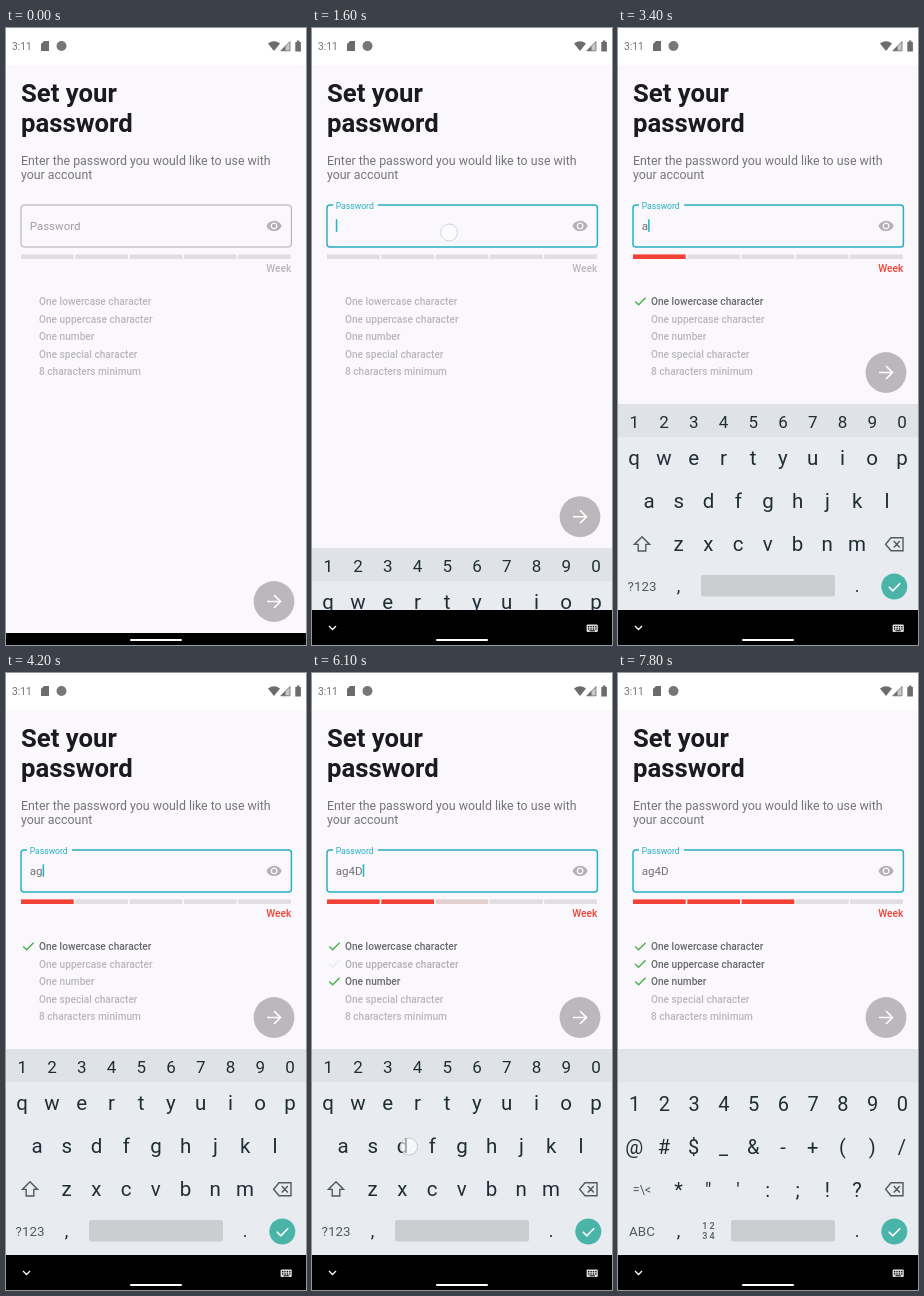
Animation, 300 px wide and 617 px high, one loop 8 s. Source, as an HTML page:

```html
<!DOCTYPE html>
<html lang="en">
<head>
<meta charset="utf-8">
<title>Set your password</title>
<style>
html, body { margin: 0; width: 100%; height: 100%; overflow: hidden; background: #faf8fc; }
svg { display: block; width: 300px; height: 617px; font-family: Roboto, sans-serif; }
.mid { text-anchor: middle; }
.line { fill: none; stroke-linecap: butt; }
</style>
</head>
<body>
<svg id="stage" viewBox="0 0 300 617"></svg>
<script>
const LOOP = 8000;
const OFF = '#b9b7ba', ON = '#69686a', RED = '#f44336', TEAL = '#27b0c5';
const KEY = '#202d36', SOFT = '#505a62';
const stage = document.getElementById('stage');
const $ = id => document.getElementById(id);

const esc = s => s.replace(/&/g, '&amp;').replace(/</g, '&lt;');
const text = (s, x, y, size, fill, extra = '') =>
  `<text x="${x}" y="${y}" font-size="${size}" fill="${fill}" ${extra}>${esc(s)}</text>`;
const rect = (x, y, w, h, fill, extra = '') =>
  `<rect x="${x}" y="${y}" width="${w}" height="${h}" fill="${fill}" ${extra}/>`;
const disc = (x, y, r, fill, extra = '') =>
  `<circle cx="${x}" cy="${y}" r="${r}" fill="${fill}" ${extra}/>`;
const line = (d, stroke, width, extra = '') =>
  `<path class="line" d="${d}" stroke="${stroke}" stroke-width="${width}" ${extra}/>`;

const keys = (chars, x, y, size) => [...chars].map((c, i) =>
  text(c, x + i * 29.75, y, size, KEY, 'class="mid"')).join('');

const statusBar = () =>
  rect(0, 0, 300, 37, '#fff') +
  text('3:11', 6, 22, 10.2, '#707072') +
  '<path d="M38 13h5v10h-8v-7z" fill="#6c6c6e"/>' +
  disc(55.5, 18, 5, '#77777a') +
  '<path d="M262 15.5Q268 11 274 15.5L268 23z" fill="#6c6c6e"/>' +
  '<path d="M284 13.5v9.3h-9.2z" fill="#c9c9cb" stroke="#6c6c6e" stroke-width=".8"/>' +
  '<path d="M279.5 18v4.8h-4.7z" fill="#6c6c6e"/>' +
  '<path d="M289.3 14h1.5v-1.4h2.6V14h1.5v9.4h-5.6z" fill="#6c6c6e"/>';

const heading = () =>
  text('Set your', 15, 74.3, 25.7, '#1b1a1d', 'font-weight="700"') +
  text('password', 15, 104.3, 25.7, '#1b1a1d', 'font-weight="700"') +
  text('Enter the password you would like to use with', 15, 136.8, 12.36, '#757477') +
  text('your account', 15, 151.4, 12.36, '#757477');

const field = () =>
  rect(15, 177, 270.4, 42, 'none', 'id="box" rx="3"') +
  rect(21, 175, 45, 4, '#faf8fc', 'id="gap"') +
  text('Password', 0, 0, 11.5, OFF, 'id="label"') +
  text('', 23.7, 201.8, 11.6, '#727174', 'id="typed"') +
  rect(24, 191.3, 1.5, 12.5, TEAL, 'id="cursor"') +
  `<path transform="translate(259.8 189.6) scale(.69)" fill="#b4b1b5" d="M12 4.5C7 4.5 2.73 7.61 1 12
   c1.73 4.39 6 7.5 11 7.5s9.27-3.11 11-7.5c-1.73-4.39-6-7.5-11-7.5zM12 17c-2.76 0-5-2.24-5-5s2.24-5 5-5
   5 2.24 5 5-2.24 5-5 5zm0-8c-1.66 0-3 1.34-3 3s1.34 3 3 3 3-1.34 3-3-1.34-3-3-3z"/>`;

const rules = ['One lowercase character', 'One uppercase character', 'One number',
  'One special character', '8 characters minimum'];

const meter = () => rules.map((s, i) => {
  const y = 277 + i * 17.5;
  return rect(15 + i * 54.3, 226.4, 52.7, 4.6, '#e0dee0', `id="seg${i}"`) +
    text(s, 33, y, 10.15, OFF, `id="rule${i}" font-weight="500"`) +
    line(`M17.2 ${y - 3.5}l3.4 3.3 7-7`, '#4caf50', 1.4, `id="tick${i}"`);
}).join('') + text('Week', 285.3, 244.2, 10.2, OFF, 'id="grade" text-anchor="end" font-weight="500"');

const letterRows = (id, top, mid, low) => `<g id="${id}">` + rect(0, 376, 300, 33, '#dfe3e7') +
  keys('1234567890', 16.2, 400, 17) + keys(top, 16.2, 436.5, 20.5) +
  keys(mid, 31, 479.5, 20.5) + keys(low, 60.5, 522.5, 20.5) +
  line('M24 508.8l7.6 7.6h-3.8v6.6h-7.6v-6.6h-3.8z', SOFT, 1.4,
    id === 'upper' ? `style="fill:${SOFT}"` : '') +
  text('?123', 24, 563, 13.4, SOFT, 'class="mid"') +
  rect(83, 547, 134, 21.5, '#cbcdd0', 'rx="2.5"') + '</g>';

const symbolRows = () => '<g id="symbols">' + rect(0, 376, 300, 33, '#e1e4e8') +
  keys('1234567890', 16.6, 438, 20) + keys('@#$_&-+()/', 16.2, 481, 20) +
  keys('*"\':;!?', 60.5, 523.5, 20) +
  text('=\\<', 24, 521, 12.5, SOFT, 'class="mid"') +
  text('ABC', 24, 563, 13.4, SOFT, 'class="mid"') +
  text('1 2', 90.5, 556, 9, SOFT, 'class="mid" font-weight="500"') +
  text('3 4', 90.5, 566, 9, SOFT, 'class="mid" font-weight="500"') +
  rect(113, 547, 104, 21.5, '#cbcdd0', 'rx="2.5"') + '</g>';

const keyboard = () => '<g id="keyboard">' + rect(0, 376, 300, 241, '#e8ecf0') +
  letterRows('lower', 'qwertyuiop', 'asdfghjkl', 'zxcvbnm') +
  letterRows('upper', 'QWERTYUIOP', 'ASDFGHJKL', 'ZXCVBNM') +
  symbolRows() +
  line('M273 509.8h12v13h-12l-5.4-6.5zM275.8 513l6 6.4M281.8 513l-6 6.4', SOFT, 1.4) +
  text(',', 60.5, 564, 18, KEY, 'class="mid"') + text('.', 239, 564, 18, KEY, 'class="mid"') +
  disc(276.3, 558.5, 13, '#4ab4a8') + line('M270.8 558.8l4 4 7.4-7.6', '#fff', 1.6) + '</g>';

const navBar = () => {
  let dots = '';
  for (let i = 0; i < 8; i++)
    dots += rect(276 + (i % 4) * 2.4, 598 + (i >> 2) * 2.3, 1.3, 1.3, '#000');
  return line('M17 599.5l3.5 3.5 3.5-3.5', '#d3ead5', 1.2, 'id="hint"') +
    '<g id="nav">' + rect(0, 582, 300, 35, '#000') +
    line('M17 598l3.5 3.5 3.5-3.5', '#fff', 1.3) +
    rect(274.6, 596.4, 11.2, 7.6, '#ddd', 'rx="1"') + dots +
    rect(277.5, 602.3, 5.4, 1, '#000') + '</g>' +
    rect(0, 605, 300, 12, '#000') + rect(124, 611, 52, 2, '#fff', 'rx="1"');
};

stage.innerHTML = rect(0, 0, 300, 617, '#faf8fc') + statusBar() + heading() + field() + meter() +
  '<g id="fab">' + disc(268, 573.5, 20.4, '#bcb7bb') +
  line('M261 573.5h13M268 567l6.5 6.5-6.5 6.5', '#fff', 1.6) + '</g>' +
  keyboard() + navBar() +
  disc(0, 0, 8.5, '#fff', 'id="touch" fill-opacity=".62" stroke="#c3c6ca" stroke-width="1"');

const taps = [
  [1390, 1560, 137, 204.5], [2590, 2780, 31, 473], [3490, 3680, 150, 473], [4390, 4580, 105, 394],
  [5190, 5370, 24, 516], [5790, 6090, 97, 473.5], [7490, 7580, 24, 558.5]
];
const typing = [[2770, 'a'], [3670, 'g'], [4570, '4'], [6070, 'D']];
const strengthAt = [2770, 4570, 6070];      // segments fill in order
const ruleAt = [2770, 6070, 4570];          // time each rule is met
const cursorOff = [[2390, 2770], [6990, LOOP]];

const ramp = (t, from, len) => Math.min(1, Math.max(0, (t - from) / len));
const easeOut = p => 1 - (1 - p) ** 3;
const rgb = c => [1, 3, 5].map(i => parseInt(c.slice(i, i + 2), 16));
const mix = (a, b, p) => {
  const to = rgb(b);
  return `rgb(${rgb(a).map((v, i) => Math.round(v + (to[i] - v) * p))})`;
};
const set = (id, attrs) => {
  for (const k in attrs) $(id).setAttribute(k, attrs[k]);
};
const show = (id, on) => set(id, { opacity: +on });

function draw(t) {
  const focus = t >= 1440, float = easeOut(ramp(t, 1440, 200));
  set('box', { stroke: focus ? TEAL : t >= 1390 ? '#8f8e91' : '#a9a8aa', 'stroke-width': focus ? 1.5 : 1 });
  set('gap', { x: 43.5 - 22.5 * float, width: 45 * float });
  set('label', {
    transform: `translate(23.7 ${201.8 - 20.6 * float}) scale(${1 - 0.25 * float})`,
    fill: mix('#9f9da0', TEAL, float)
  });

  $('typed').textContent = typing.filter(k => t >= k[0]).map(k => k[1]).join('');
  const len = $('typed').textContent ? $('typed').getComputedTextLength() : 0;
  set('cursor', { x: 23.8 + len });
  show('cursor', t >= 1390 && !cursorOff.some(([a, b]) => t >= a && t < b));

  rules.forEach((_, i) => {
    const fill = i < 3 ? ramp(t, strengthAt[i], 300) : 0;
    const met = i < 3 ? ramp(t, ruleAt[i], 300) : 0;
    set('seg' + i, { fill: mix('#e0dee0', RED, fill) });
    set('rule' + i, { fill: mix(OFF, ON, met) });
    show('tick' + i, met);
  });
  set('grade', { fill: mix(OFF, RED, ramp(t, strengthAt[0], 300)) });

  const rise = easeOut(ramp(t, 1540, 420));
  set('keyboard', { transform: `translate(0 ${229 * (1 - rise)})` });
  set('fab', { transform: `translate(0 ${-229 * rise})` });
  show('keyboard', rise > 0);
  show('hint', t >= 1390);
  show('nav', ramp(t, 1440, 100));

  const symbols = t >= 7580, upper = t >= 5370 && t < 6080;
  show('symbols', symbols);
  show('upper', upper);
  show('lower', !symbols && !upper);

  const tap = taps.find(([a, b]) => t >= a && t < b + 150);
  show('touch', tap ? 1 - ramp(t, tap[1], 150) : 0);
  if (tap) set('touch', { cx: tap[2], cy: tap[3] });
}

let start;
function tick(now) {
  start ??= now;
  draw((now - start) % LOOP);
  requestAnimationFrame(tick);
}
draw(0);
requestAnimationFrame(tick);
</script>
</body>
</html>
```
